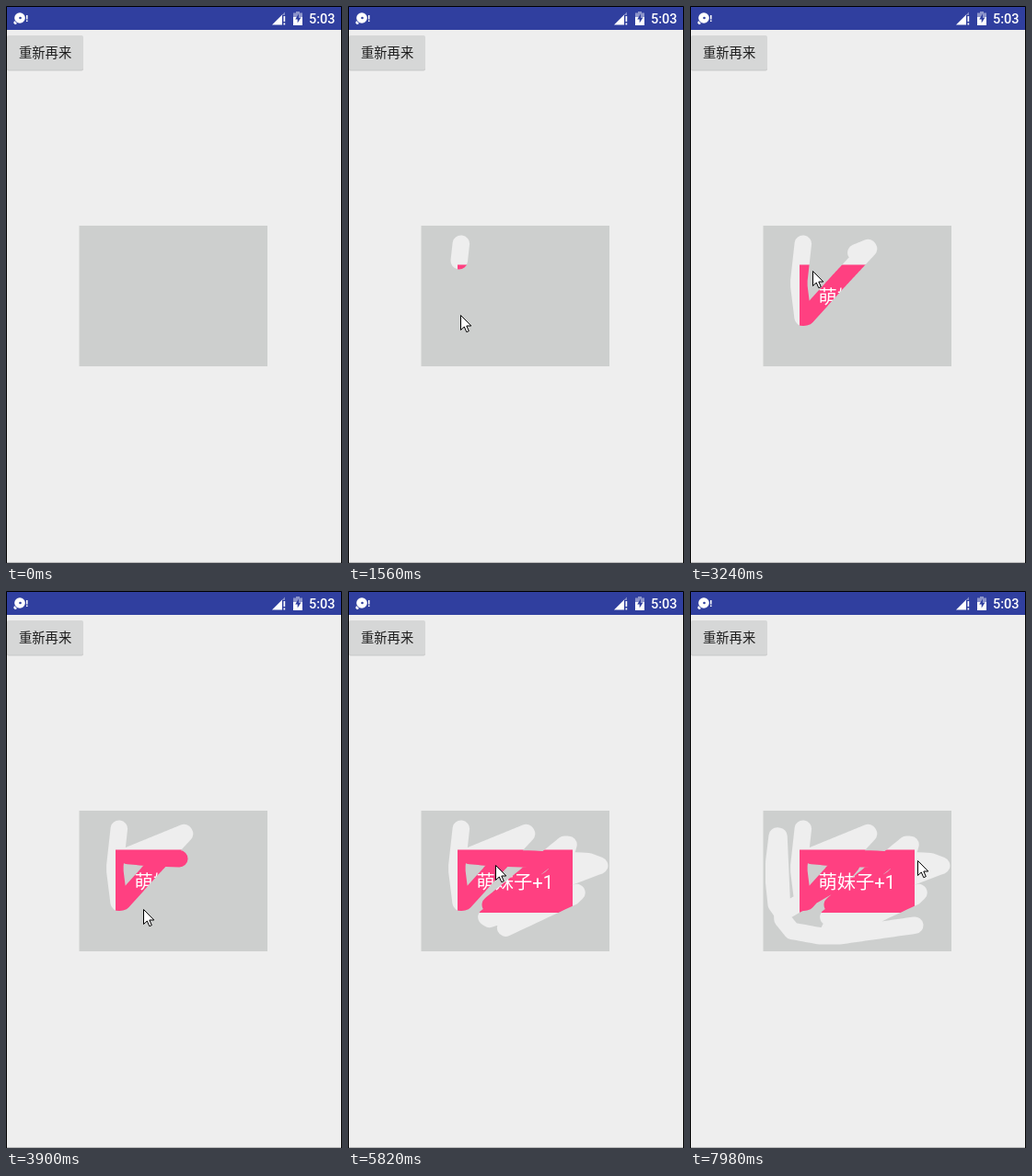
Write an HTML page that moves like this. It is 365x606 px and loops after 8000 ms.

```html
<!DOCTYPE html>
<html lang="zh-CN">
<head>
<meta charset="utf-8">
<title>Scratch card</title>
<style>
  html, body { margin: 0; width: 100%; height: 100%; overflow: hidden; background: #eee; }
  svg { display: block; width: 365px; height: 606px; }
  text { font-family: Roboto, "Noto Sans CJK SC", "Noto Sans CJK", sans-serif; }
</style>
</head>
<body>
<svg viewBox="0 0 365 606">
  <defs>
    <mask id="scratched" maskUnits="userSpaceOnUse" x="0" y="0" width="365" height="606">
      <rect width="365" height="606" fill="#fff"/>
      <path id="trail" fill="none" stroke="#000" stroke-width="18.500" stroke-linecap="round" stroke-linejoin="round"/>
    </mask>
  </defs>

  <rect width="365" height="606" fill="#eee"/>
  <rect width="365" height="26" fill="#303f9f"/>

  <!-- status icons -->
  <g fill="#fff">
    <circle cx="15" cy="13" r="5.800"/>
    <path d="M9 16l3 3-2 1.200-1.800-1.600z"/>
    <rect x="22" y="10" width="1.500" height="4.500"/>
    <rect x="22" y="15.500" width="1.500" height="1.500"/>
    <path d="M289 20.500L300 9.500V20.500z"/>
    <path d="M300 9.500L303 6.500V10H300z" opacity=".4"/>
    <rect x="301.500" y="11" width="1.700" height="6"/>
    <rect x="301.500" y="18.500" width="1.700" height="2"/>
    <path d="M312 7.500h3V6h4v1.500h3V13H312z" opacity=".45"/>
    <path d="M312 12h10v9H312z"/>
  </g>
  <circle cx="15.500" cy="13" r="1.300" fill="#303f9f"/>
  <path d="M318 8.500l-3.800 6h2.500v4l3.800-6H318z" fill="#303f9f"/>
  <text x="329" y="19" font-size="14.500" font-weight="500" fill="#fff">5:03</text>

  <!-- reset button -->
  <rect x="1" y="33" width="83" height="37.500" rx="2" fill="#000" opacity=".16"/>
  <rect x="1" y="32" width="83" height="37.500" rx="2" fill="#d6d7d7"/>
  <text x="14" y="56" font-size="14.300" font-weight="500" fill="#1c1c1c">重新再来</text>

  <!-- prize and cover -->
  <rect x="119" y="281.500" width="125" height="68.500" fill="#ff4081"/>
  <text x="139.500" y="323.500" font-size="20.300" fill="#fff">萌妹子+1</text>
  <rect x="79.500" y="239" width="204.500" height="153" fill="#cdcfce" mask="url(#scratched)"/>

  <path d="M.5 606V.5H364.500V606" fill="none" stroke="#000"/>
  <path d="M1 605.500H364" stroke="#bbb"/>

  <path id="cursor" fill="#fff" stroke="#000" stroke-linejoin="round"
    d="M.5 .5V16.500L4.300 13L6.800 18.700L9.300 17.600L6.800 12H11.800z"/>
</svg>
<script>
  const LOOP = 8000, STEP = 60;
  const ENTER = 180, PRESS = 840;  // pointer appears, pointer goes down
  const LAG = 540, BLUR = 30;      // the scratch trails the pointer and rounds its turns
  const trail = document.getElementById('trail');
  const cursor = document.getElementById('cursor');

  // turning points of the hand: [ms, x, y]
  const turns = [
    [ENTER, 342, 78], [PRESS, 123, 257], [1240, 118, 302], [1620, 123, 342],
    [1920, 157, 304], [2520, 196, 262], [3280, 130, 289], [3490, 283, 295],
    [3900, 149, 346], [4380, 241, 271], [4600, 230, 307], [4860, 140, 361],
    [5130, 262, 324], [5320, 147, 378], [5600, 167, 338], [5820, 160, 298],
    [5960, 180, 292], [6100, 160, 316], [6480, 95, 353], [6600, 90, 305],
    [6740, 96, 256], [7050, 101, 368], [7200, 150, 377], [7470, 256, 362],
    [LOOP, 247, 290]
  ];

  const mix = (a, b, p) => a + (b - a) * p;

  function hand(t) {
    const i = turns.findIndex(k => k[0] > t);
    const [t0, x0, y0] = turns[i - 1], [t1, x1, y1] = turns[i];
    const p = (t - t0) / (t1 - t0);
    return [mix(x0, x1, p), mix(y0, y1, p)];
  }

  function scratch(t) {
    const [ax, ay] = hand(Math.max(PRESS, t - BLUR)), [bx, by] = hand(t + BLUR);
    return [mix(ax, bx, .5), mix(ay, by, .5)];
  }

  function draw(now) {
    const t = Math.floor(now % LOOP / STEP) * STEP;
    cursor.setAttribute('visibility', t < ENTER ? 'hidden' : 'visible');
    if (t >= ENTER) {
      cursor.setAttribute('transform', `translate(${hand(t).map(Math.round)})`);
    }
    const points = [];
    for (let s = PRESS; s <= t - LAG; s += 10) points.push(scratch(s));
    trail.setAttribute('d', points.length ? 'M' + points.join('L') : '');
    requestAnimationFrame(draw);
  }
  requestAnimationFrame(draw);
</script>
</body>
</html>
```
